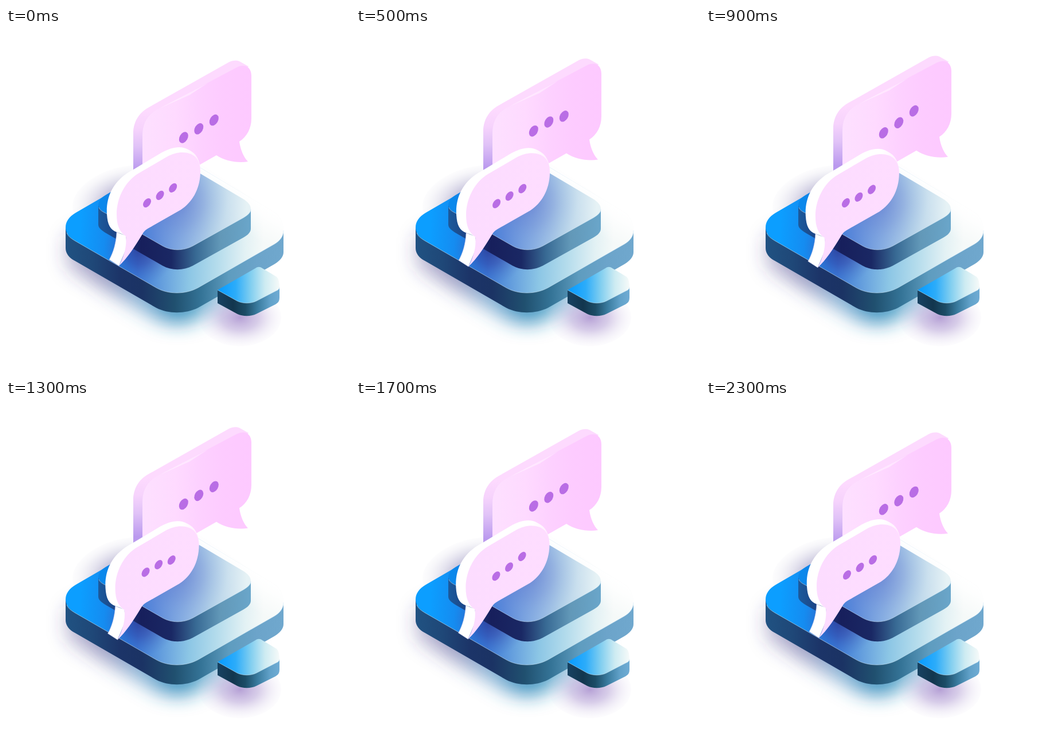
An HTML page that plays this animation: 600x600 px, repeating every 2400 ms.

```html
<!DOCTYPE html>
<html lang="en">
<head>
<meta charset="utf-8">
<title>Chat bubbles</title>
<style>
  html, body { margin: 0; width: 100%; height: 100%; overflow: hidden; background: #fff; }
  svg { display: block; width: 100vw; height: 100vh; }
  .rim { fill: none; stroke: #d4ecfa; stroke-width: .8; stroke-opacity: .7; }
</style>
</head>
<body>
<svg viewBox="0 0 600 600">
  <defs id="defs">
    <filter id="blur" x="-30%" y="-30%" width="160%" height="160%"><feGaussianBlur stdDeviation="16"/></filter>
    <path id="slab" d="M104 347V384C104 393 110 401 120 406L262 488C283 499 313 499 335 488L468 412C478 406 484 399 484 391V353L300 240Z"/>
    <path id="base" d="M104 347C104 338 110 329 122 322L260 242C282 229 314 229 336 242L466 320C478 327 484 339 484 353C484 363 478 371 468 377L335 453C313 465 283 465 262 453L120 371C108 364 104 356 104 347Z"/>
    <path id="step" d="M161 309C161 301 167 295 176 290L275 232C290 224 308 226 322 244L415 299C423 304 427 310 427 316C427 322 422 326 414 331L326 380C309 389 289 389 273 380L174 323C165 318 161 314 161 309Z"/>
  </defs>

  <!-- soft shadows -->
  <ellipse cx="208" cy="296" rx="94" ry="54" transform="rotate(-14 208 296)" fill="url(#shadeBack)"/>
  <use href="#slab" y="20" fill="url(#shadeBase)" filter="url(#blur)"/>
  <ellipse cx="408" cy="505" rx="72" ry="50" fill="url(#shadeTile)"/>

  <!-- base slab -->
  <use href="#slab" fill="url(#baseSide)"/>
  <use href="#base" fill="url(#baseFace)"/>
  <use href="#base" fill="url(#baseDark)"/>
  <use href="#base" fill="url(#baseFade)"/>
  <path class="rim" d="M106 357C108 363 112 366 120 371L262 453C283 465 313 465 335 453L468 377C478 371 484 363 484 353"/>

  <!-- upper slab -->
  <path fill="url(#stepSide)" d="M161 309V343C161 348 165 352 174 357.5L273 414.5C289 423.5 309 423.5 326 414.5L414 365.5C422 361 427 356 427 350V316Z"/>
  <use href="#step" fill="url(#stepFace)"/>
  <use href="#step" fill="url(#stepDark)"/>
  <path class="rim" d="M162 313C164 318 168 320 174 323L273 380C289 389 309 389 326 380L414 331C422 326 427 322 427 316"/>

  <!-- small tile -->
  <path fill="url(#tileSide)" d="M369 457V480L403 498.5C413 503.5 427 503.5 437 498.5L470 482C475 479 477 476 477 470V452Z"/>
  <path fill="url(#tileFace)" d="M369 457L435 419C439 416 443 416 447 419L472 434C476 437 477 446 477 453C476 456 474 457 470 459L437 476C427 481 413 481 403 476Z"/>
  <path class="rim" d="M369 457L403 476C413 481 427 481 437 476L470 459C475 457 477 455 477 452"/>

  <!-- large bubble -->
  <g id="big">
    <path fill="url(#bigSide)" d="M222 262V183C222 164 232 148 248 139L388 60C395 56 402 56 407 58L423 67L400 100L250 262Z"/>
    <path fill="url(#bigFace)" d="M238 262V188C238 166 247 151 264 142L402 69C417 61 428 69 428 83V158C428 175 420 190 407 198C409 213 415 226 422 233C404 236 382 232 367 222L265 280Z"/>
    <path d="M268 140L352 96L320 117Z" fill="#fff" opacity=".4"/>
  </g>

  <!-- small bubble -->
  <g id="small">
    <path fill="#fff" stroke="#a8afe0" stroke-width=".6" d="M193 356C192 375 187 392 180 404L197 415L212 380L209 362Z"/>
    <path fill="url(#smallSide)" d="M176 325C174 292 189 264 222 247L272 217C287 209 304 204 318 212C333 219 339 232 339 250L300 310L209 364C204 359 199 358 193 356C182 352 177 343 176 325Z"/>
    <path fill="url(#smallFace)" d="M339 250C339 280 325 304 305 317L247 350C242 353 240 356 237 361C225 381 211 402 197 415C206 398 211 381 209 363C198 356 193 344 193 325C193 296 208 267 232 253L280 225C296 216 311 215 323 220C334 225 339 236 339 250Z"/>
  </g>
</svg>
<script>
const NS = 'http://www.w3.org/2000/svg';
const $ = id => document.getElementById(id);

function make(tag, attrs, parent) {
  const el = document.createElementNS(NS, tag);
  for (const key in attrs) el.setAttribute(key, attrs[key]);
  return parent.appendChild(el);
}

// stops: "offset color opacity" separated by commas
function gradient(tag, id, attrs, stops) {
  const el = make(tag, { id, ...attrs }, $('defs'));
  for (const stop of stops.split(',')) {
    const [offset, color, opacity = 1] = stop.trim().split(' ');
    make('stop', { offset, 'stop-color': color, 'stop-opacity': opacity }, el);
  }
}
const line = (id, x1, y1, x2, y2, stops) =>
  gradient('linearGradient', id, { x1, y1, x2, y2, gradientUnits: 'userSpaceOnUse' }, stops);
const spot = (id, cx, cy, r, stops) =>
  gradient('radialGradient', id, { cx, cy, r, gradientUnits: 'userSpaceOnUse' }, stops);
const glow = (id, stops) => gradient('radialGradient', id, {}, stops);

glow('shadeBack', '0 #5c4f9c .6, .5 #7d75ae .3, .85 #a9a5c8 .1, 1 #c0bdd6 .04');
glow('shadeTile', '0 #7a54b4 .55, .45 #8e70c0 .35, .75 #ab96d0 .16, 1 #d0c4e6 .05');
line('shadeBase', 104, 0, 440, 0,
  '0 #3a3080 .3, .2 #3c3c88 .5, .4 #3a82bc .6, .6 #1a80b4 .85, .8 #3a98c4 .45, 1 #60b0d4 0');

line('baseSide', 104, 0, 484, 0,
  '0 #205282, .12 #1f4878, .25 #1c3468, .35 #1b3364, .5 #20506f, .62 #347396, .75 #5e9cbf, .88 #6ca4ca, 1 #70a8ce');
line('baseFace', 130, 330, 450, 340,
  '0 #0c9eff, .15 #168aef, .32 #3c7ad6, .46 #66a0de, .6 #8cc6e5, .75 #b4dcec, .9 #e2f1f4, 1 #f5f9f8');
spot('baseDark', 234, 384, 64, '0 #24257f .65, .45 #2b3196 .4, 1 #3a60c0 0');
line('baseFade', 336, 242, 306, 294, '0 #fff, .25 #fff .9, 1 #fff 0');
line('stepSide', 161, 0, 427, 0,
  '0 #1b5a9c, .13 #1c4284, .28 #171f5c, .48 #1a2864, .64 #386a94, .8 #6298b8, 1 #6aa6ca');
line('stepFace', 170, 310, 420, 310,
  '0 #0a88ec, .15 #2e78d8, .35 #5a88da, .55 #86ade2, .75 #b2d0e8, 1 #e6f2f5');
spot('stepDark', 302, 302, 85, '0 #4a58c4 .42, .5 #5c70cc .24, 1 #7a9cdc 0');
line('tileSide', 369, 0, 477, 0,
  '0 #184262, .25 #12364e, .45 #1c4c66, .65 #3a7ca0, .85 #62a2ca, 1 #70acd4');
line('tileFace', 375, 0, 477, 0,
  '0 #0c9eff, .25 #2cacfa, .5 #7ecdf0, .75 #cdebf2, 1 #f6faf9');
line('bigSide', 0, 145, 0, 248, '0 #fddafe, .3 #f6d3fc, .6 #e0c2f7, 1 #ba99ee');
line('bigFace', 238, 0, 428, 0, '0 #fde0ff, .3 #fedaff, .55 #fdd0ff, .75 #fdcbff, 1 #fdc9ff');
line('smallSide', 270, 0, 335, 0, '0 #fff, .6 #fff, 1 #ffeefe');
line('smallFace', 193, 0, 339, 0, '0 #fcdcff, 1 #feddff');

const dots = [];
function addDots(parent, x, y, dx, dy, rx, ry, tilt, peak) {
  for (let i = 0; i < 3; i++) {
    const el = make('ellipse', { rx, ry, fill: '#b96de5' }, $(parent));
    dots.push({ el, x: x + i * dx, y: y + i * dy, tilt, peak: peak + i * 200 });
  }
}
addDots('big', 309.8, 191, 26.5, -15.2, 7, 10.5, 30, 385);
addDots('small', 246, 305, 22.6, -13.1, 5.8, 9, 35, 1195);

const LOOP = 2400, STEP = 100, HOP = 960;
const move = (el, x, y, tilt = 0) =>
  el.setAttribute('transform', `translate(${x} ${y}) rotate(${tilt})`);

function draw(now) {
  const t = Math.floor(now % LOOP / STEP) * STEP;
  const sway = (1 - Math.cos(2 * Math.PI * t / LOOP)) / 2;
  move($('big'), 0, -9.6 * sway);
  move($('small'), -2.5 * sway, 3.4 * sway);
  for (const { el, x, y, tilt, peak } of dots) {
    const gap = Math.abs(t - peak);
    const hop = t > 0 && gap < HOP / 2 ? 4.5 * (1 + Math.cos(2 * Math.PI * gap / HOP)) : 0;
    move(el, x, y - hop, tilt);
  }
}

const start = performance.now();
function tick() {
  draw(performance.now() - start);
  requestAnimationFrame(tick);
}
tick();
</script>
</body>
</html>
```
